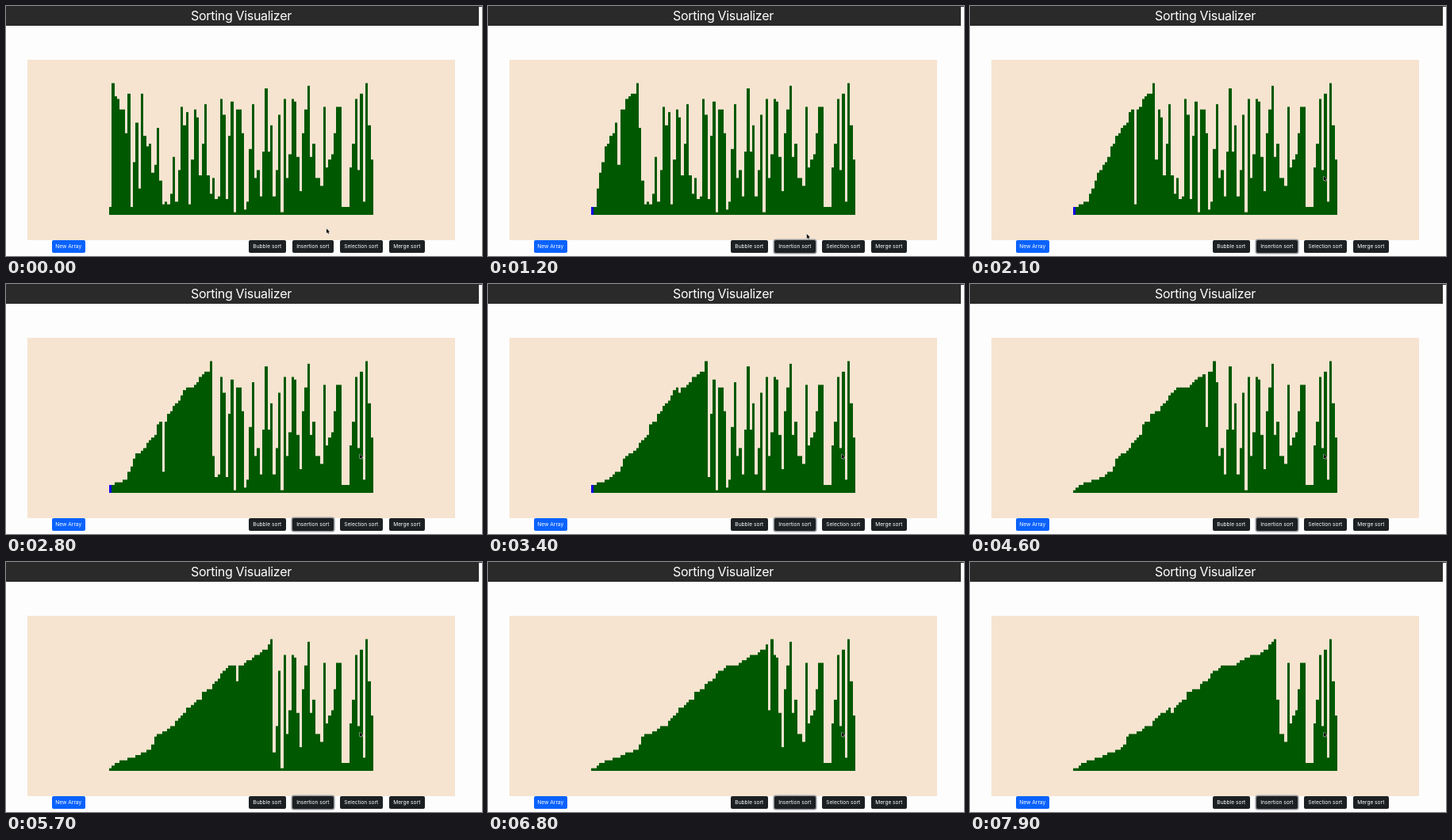
Recreate the animation shown at these times as an HTML page with a canvas. Size 600x316 px, loop 8 s.

```html
<!DOCTYPE html>
<html lang="en">
<head>
<meta charset="utf-8">
<title>Sorting Visualizer</title>
<style>
  html, body { margin: 0; width: 100%; height: 100%; overflow: hidden; background: #fdfdfd; }
  body { position: relative; font-family: Inter, Roboto, "Open Sans", sans-serif; color: #fff; }
  header, main, button, canvas { position: absolute; }
  header {
    left: 0; top: 0; width: 596px; height: 25px; background: #2a2a2a;
    font-size: 16px; font-weight: 400; line-height: 25px; text-align: center;
    letter-spacing: -0.02em; text-indent: -3px; box-shadow: 4px -24px 0 #2a2a2a;
  }
  main { left: 27px; top: 67.5px; width: 539px; height: 228.5px; background: #f6e4d0; }
  button {
    top: 296px; height: 16px; padding: 0; border: 0; border-radius: 2px;
    background: #1d2023; color: #fff; font: 400 6.6px/16px Inter, Roboto, sans-serif;
    white-space: nowrap; outline: 0;
  }
  button.primary { background: #0a62fd; }
  button.focus { box-shadow: 0 0 0 1.6px #9b9da0; }
  canvas { left: 0; top: 0; pointer-events: none; }
</style>
</head>
<body>
<header>Sorting Visualizer</header>
<main></main>
<button class="primary" style="left:57.5px;width:42.5px">New Array</button>
<button style="left:306px;width:46.5px">Bubble sort</button>
<button id="insertion" style="left:361px;width:51.5px">Insertion sort</button>
<button style="left:421px;width:53.5px">Selection sort</button>
<button style="left:483px;width:44.5px">Merge sort</button>
<canvas id="stage" width="600" height="316"></canvas>
<script>
const LOOP = 8000, TICK = 100, CLICK = 700;
const LEFT = 130, BASE = 264, UNIT = 3.33;
const START = [
  3, 50, 45, 44, 40, 40, 31, 46, 3, 20, 35, 10, 46, 30, 26, 27, 16, 19, 33, 13,
  4, 5, 4, 8, 22, 5, 17, 41, 34, 39, 4, 21, 40, 37, 15, 27, 42, 15, 8, 14,
  6, 7, 44, 38, 6, 30, 43, 1, 40, 40, 31, 2, 5, 25, 42, 14, 17, 7, 24, 48,
  24, 34, 7, 17, 38, 1, 44, 14, 23, 44, 43, 22, 9, 31, 40, 49, 22, 27, 14, 14,
  11, 41, 18, 21, 23, 31, 41, 41, 3, 3, 3, 18, 27, 44, 17, 46, 5, 50, 34, 21
];
// [time, swaps done]
const PACE = [[733, 0], [2100, 275], [3400, 536], [4600, 779], [5700, 997], [6800, 1221], [7900, 1442]];
// [time, x, y]
const POINTER = [[0, 404, 281.5], [100, 403, 284], [200, 403, 284], [600, 393, 303], [1100, 393, 303], [1700, 446, 215]];

const ctx = document.getElementById('stage').getContext('2d');
const insertion = document.getElementById('insertion');

function sample(keys, t, col) {
  if (t <= keys[0][0]) return keys[0][col];
  for (let k = 1; k < keys.length; k++) {
    const a = keys[k - 1], b = keys[k];
    if (t <= b[0]) return a[col] + (b[col] - a[col]) * (t - a[0]) / (b[0] - a[0]);
  }
  return keys[keys.length - 1][col];
}

// Insertion sort by neighbour swaps, stopped after a number of swaps.
function sortUpTo(limit) {
  const bars = START.slice();
  let swaps = 0, firstMoved = false;
  for (let i = 1; i < bars.length; i++) {
    for (let j = i; j > 0 && bars[j - 1] > bars[j]; j--) {
      if (swaps++ >= limit) return { bars, firstMoved };
      [bars[j - 1], bars[j]] = [bars[j], bars[j - 1]];
      if (j === 1) firstMoved = true;
    }
  }
  return { bars, firstMoved };
}

function drawBars(t) {
  const { bars, firstMoved } = sortUpTo(Math.round(sample(PACE, t, 1)));
  const marked = t >= CLICK && !firstMoved;
  bars.forEach((v, i) => {
    const x = Math.round(LEFT + i * UNIT), end = Math.round(LEFT + (i + 1) * UNIT);
    const h = v * UNIT;
    ctx.fillStyle = marked && i === 0 ? '#1400f0' : '#005800';
    ctx.fillRect(x, BASE - h, end - x, h);
  });
}

function drawPointer(x, y) {
  const shape = [[0, 0], [0, 5.6], [1.3, 4.4], [2.2, 6.4], [3.1, 6], [2.3, 4.1], [4, 4]];
  ctx.beginPath();
  shape.forEach(([dx, dy]) => ctx.lineTo(x + dx, y + dy));
  ctx.closePath();
  ctx.lineWidth = 0.9;
  ctx.strokeStyle = '#eee';
  ctx.stroke();
  ctx.fillStyle = '#000';
  ctx.fill();
}

function frame(now) {
  const t = Math.floor((now % LOOP) / TICK) * TICK;
  ctx.clearRect(0, 0, 600, 316);
  drawBars(t);
  drawPointer(sample(POINTER, t, 1), sample(POINTER, t, 2));
  insertion.classList.toggle('focus', t >= CLICK);
  requestAnimationFrame(frame);
}
frame(performance.now());
</script>
</body>
</html>
```
